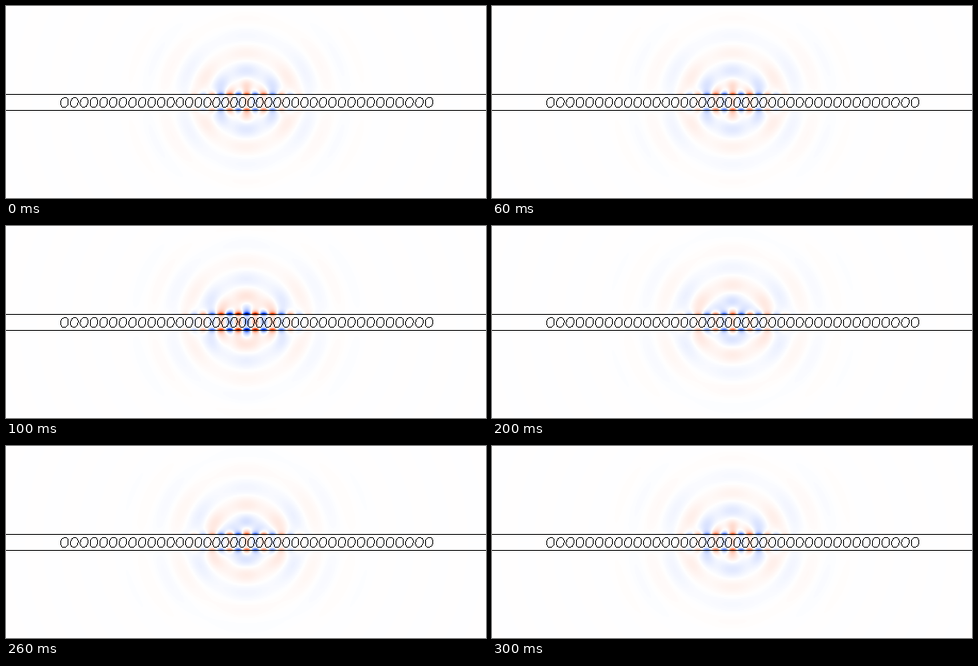
Write a matplotlib script that moves like this. It is 600 by 240 pixels and loops after 400 ms.

```python
import numpy as np
import matplotlib.pyplot as plt
from matplotlib.animation import FuncAnimation
from matplotlib.colors import LinearSegmentedColormap

W, H, DPI = 600, 240, 100
FRAMES, INTERVAL = 4, 100
CX, CY, HALF = 300, 120, 10
WAVE = 44

# Hole spacing widens smoothly from the cavity centre to the mirrors.
n = np.arange(20)
gap = 10.6 + 1.6 * (1 - (1 - n / 19) ** 2)
step = gap.copy()
step[0] /= 2
right = np.cumsum(step)
holes = CX + 0.5 + np.concatenate([-right[::-1], right])
widths = 0.82 * np.concatenate([gap[::-1], gap])
site = np.arange(40) - 19.5

x, y = np.meshgrid(np.arange(W), np.arange(H))
dx = x - CX


def outline(mask):
    """Edge pixels of a filled shape."""
    core = mask.copy()
    for axis in (0, 1):
        for shift in (-1, 1):
            core &= np.roll(mask, shift, axis)
    return mask & ~core


# One-pixel drawing of the beam and its slightly slanted holes.
ink = np.isin(y, [CY - HALF, CY + HALF])
for hx, w in zip(holes, widths):
    u = (x - hx + 0.1 * (y - CY)) / (w / 2 + 0.2)
    ink |= outline(u ** 2 + ((y - CY) / 6.7) ** 2 <= 1)

# Bound mode: one lobe per lattice cell, strongest just outside the beam.
near = np.abs(y - CY + 0.8)
out = np.maximum(near - HALF, 0)
lobes = np.cos(np.pi * np.interp(x, holes, site))
envelope = np.exp(-(dx / 48) ** 2)
edge = np.where(near < HALF, np.exp(-((near - HALF) / 2) ** 2),
                np.exp(-out / 1.9))
core = 0.28 * np.exp(-(near / 5.5) ** 2)
tail = 0.12 * np.exp(-out / 7) * (near >= HALF)
mode = lobes * envelope * (core + 0.9 * edge + tail)

# Weak waves leaking out of the cavity, their centre just above the axis.
dy = y - CY + 3
r = np.hypot(dx, dy)
theta = np.arctan2(dy, dx)
reach = np.hypot(0.75 * dx, dy)
spread = 0.22 * np.exp(-reach / 32) * (1 - np.exp(-(r / 13) ** 2))
petals = 0.75 - 0.25 * np.cos(6 * theta)
shade = 1 - np.exp(-((y - CY) / 13) ** 2)
rad = spread * petals * shade


def field(i):
    wt = 2 * np.pi * i / 3
    return (mode * np.cos(np.pi / 3 + wt)
            + rad * np.cos(2 * np.pi * (r - 16) / WAVE - wt))


cmap = LinearSegmentedColormap.from_list("field", [
    (0, (0, 0, 0.35)), (0.2, (0, 0.25, 1)), (0.5, (1, 1, 1)),
    (0.8, (1, 0.25, 0)), (1, (0.35, 0, 0))], N=512)


def picture(i):
    rgb = cmap((field(i) + 1) / 2)[..., :3]
    rgb[ink] = 0
    return rgb


fig = plt.figure(figsize=(W / DPI, H / DPI), dpi=DPI, facecolor="white")
ax = fig.add_axes([0, 0, 1, 1])
ax.axis("off")
im = ax.imshow(picture(0), extent=(0, W, H, 0), interpolation="nearest",
               aspect="auto")


def update(i):
    im.set_data(picture(i))
    return [im]


anim = FuncAnimation(fig, update, frames=FRAMES, interval=INTERVAL,
                     repeat=True, repeat_delay=0, blit=False)
plt.show()
```
